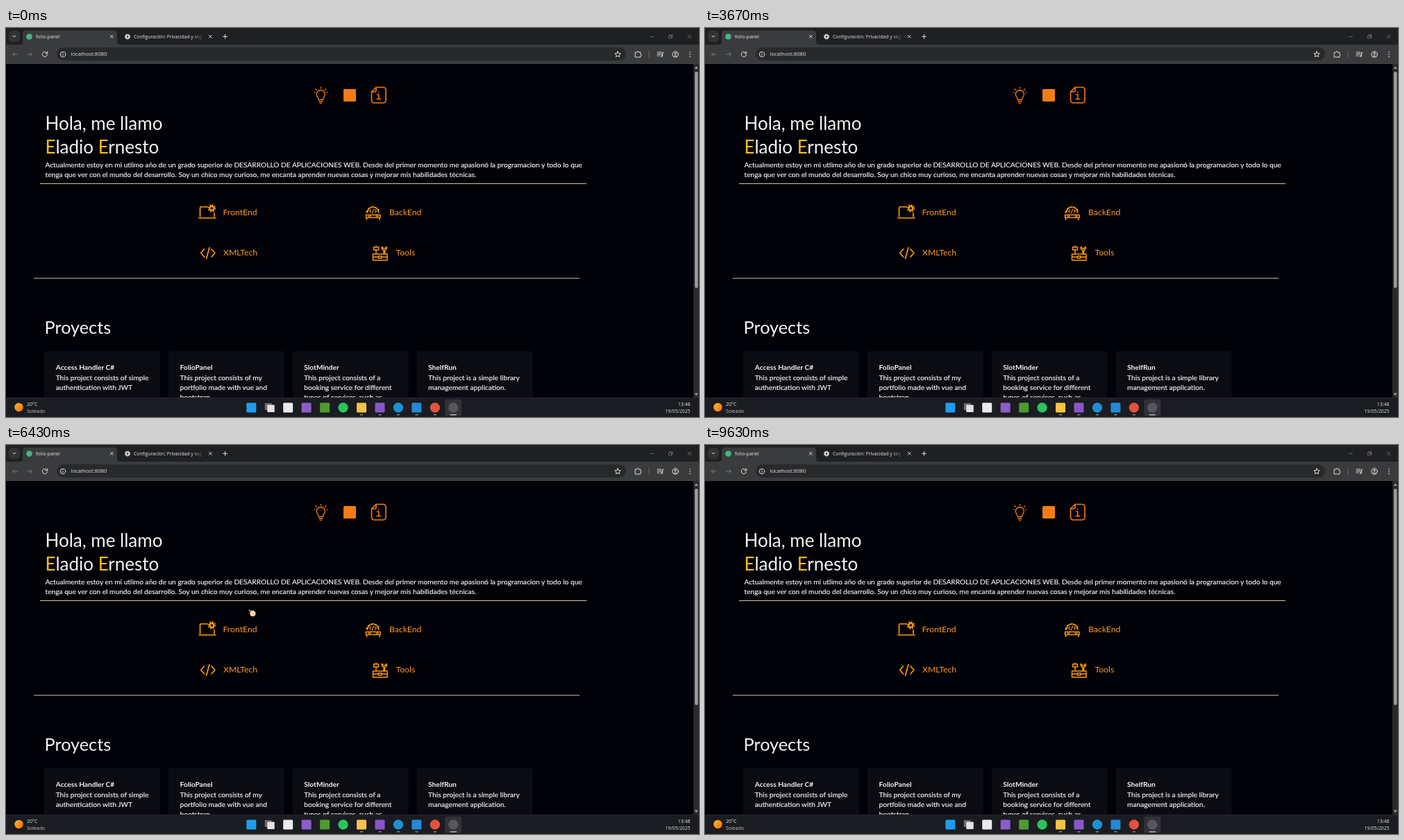
Animation, 998 px wide and 561 px high, one loop 9.73 s. Source, as an HTML page:

```html
<!DOCTYPE html>
<html lang="es">
<head>
<meta charset="utf-8">
<title>Portfolio</title>
<style>
  html, body { margin: 0; width: 100%; height: 100%; overflow: hidden; background: #010108; }
  svg { display: block; width: 100vw; height: 100vh; }
  text { font-family: Lato, sans-serif; font-size: 10.2px; fill: #f4f4f4; white-space: pre; }
  .ui text, text.ui { font-family: "Open Sans", "Noto Sans", sans-serif; font-size: 7px; fill: #e4e4e4; }
  .big { font-size: 26px; }
  .body { stroke: #f4f4f4; stroke-width: .18px; }
  .bold { font-weight: 700; }
  .label { font-size: 12.2px; fill: #ff9a1c; }
  .level { font-size: 9.1px; fill: #8f8f93; text-anchor: end; }
  .e { fill: #ffbe1a; }
  .line { fill: none; stroke-linecap: round; stroke-linejoin: round; }
  .top { stroke: #f57c14; stroke-width: 1.6; }
  .skill { stroke: #ff9a0c; stroke-width: 1.7; }
  .chrome { stroke: #dedede; stroke-width: 1; }
  .rule { stroke: #cfc7a6; stroke-width: 1; }
</style>
</head>
<body>
<svg viewBox="0 0 998 561" preserveAspectRatio="none">
  <defs>
    <clipPath id="fold"><rect id="foldBox" x="510" y="284" width="180" height="0"/></clipPath>
    <linearGradient id="fade" x1="270" x2="284" gradientUnits="userSpaceOnUse">
      <stop stop-color="#e4e4e4"/><stop offset="1" stop-color="#e4e4e4" stop-opacity="0"/>
    </linearGradient>
    <linearGradient id="sun" x2="1" y2="1"><stop stop-color="#ffb52e"/><stop offset="1" stop-color="#f0700c"/></linearGradient>
  </defs>
  <rect width="998" height="561" fill="#010108"/>

  <!-- top links -->
  <g class="line top">
    <path d="M450.3 103.5c0-3-3-4.3-3-8a6 6 0 0 1 12 0c0 3.700-3 5-3 8zM450.800 106h5M452 108.300h2.600M453.300 85.500v1.600M446 88l1.200 1.200M460.600 88l-1.200 1.200M444.500 93h.5M462 93h.5" stroke-width="1.300"/>
    <path d="M533 85.500h10q4 0 4 4v14.500q0 4-4 4h-12.500q-4 0-4-4v-12zM533 85.500v4.500q0 2-2 2h-4.500"/>
    <path d="M534.500 96h2.300v6.500M534 102.500h5.400M536.600 92.600v.3" stroke-width="1.500"/>
  </g>
  <rect x="486" y="88" width="18" height="18" rx="1.500" fill="#f57c14"/>
  <path id="under" class="rule" d="M-16.500 113h33"/>

  <g id="page">
    <text class="big" x="56.500" y="147">Hola, me llamo</text>
    <text class="big" x="56.500" y="181"><tspan class="e">E</tspan>ladio <tspan class="e">E</tspan>rnesto</text>
    <text class="body" x="56.500" y="201">Actualmente estoy en mi utlimo año de un grado superior de DESARROLLO DE APLICACIONES WEB. Desde del primer momento me apasionó la programacion y todo lo que</text>
    <text class="body" x="56.500" y="215">tenga que ver con el mundo del desarrollo. Soy un chico muy curioso, me encanta aprender nuevas cosas y mejorar mis habilidades técnicas.</text>
    <path class="rule" d="M49 224.500H836"/>

    <g class="line skill">
      <path d="M290 258h-9q-1.500 0-1.500 1.500V272M300 267v5M278 274h24" />
      <circle cx="296.300" cy="260" r="3" stroke-width="2.300"/>
      <circle cx="296.300" cy="260" r="5" stroke-dasharray="1.900 2.030" stroke-linecap="butt"/>
      <path d="M520.500 266a8 8 0 0 1 16 0" stroke-width="1.600"/>
      <path d="M519 266a9.700 9.700 0 0 1 19 0" stroke-dasharray="2.600 2.600" stroke-linecap="butt"/>
      <path d="M525.500 262l-2 2 2 2M531.500 262l2 2-2 2M529.500 261l-2 6" stroke-width="1.100"/>
      <path d="M518.500 269.500h20.500v4h-20.500zM519.500 274v2.500M538 274v2.500M522 271.500h3M533 271.500h3" stroke-width="1.500"/>
    </g>
    <text class="label" x="312.500" y="270">FrontEnd</text>
    <text class="label" x="552" y="270">BackEnd</text>
    <g id="skills" clip-path="url(#fold)"></g>

    <g id="lower">
      <g class="line skill">
        <path d="M285.500 319l-4.800 5.500 4.800 5.500M296 319l4.800 5.500-4.800 5.500M293 316.500l-4.500 16"/>
        <path d="M528.500 326h20.500v9h-20.500zM528.500 330.300h7M542 330.300h7M536.500 329h4.500v3h-4.500z" stroke-width="1.500"/>
        <path d="M529.500 316h7v4h-7zM533 314.500v1M533 320v5.500M544 325.500v-5a3.500 3.500 0 0 1-2.500-5M545.500 325.500v-5a3.500 3.500 0 0 0 2.500-5M542 316l1.500 2h2.500l1.500-2" stroke-width="1.500"/>
      </g>
      <text class="label" x="313" y="328">XMLTech</text>
      <text class="label" x="561.500" y="328">Tools</text>
      <path class="rule" d="M40 361H826"/>
      <text x="55.500" y="441" style="font-size:25.300px">Proyects</text>
      <g id="cards"></g>
    </g>
  </g>

  <!-- scrollbar -->
  <rect x="990" y="52" width="8" height="481" fill="#2a2a2c"/>
  <rect id="thumb" x="992" y="63" width="4.500" height="312" rx="2.200" fill="#9c9c9c"/>
  <path d="M991.500 59l2.600-4 2.600 4zM991.500 526.500l2.600 4 2.600-4z" fill="#9c9c9c"/>

  <!-- link address -->
  <g id="status" class="ui">
    <path d="M0 521h154q3.500 0 3.500 3.500V533H0z" fill="#37383b"/>
    <text x="2.500" y="529.300" style="font-size:6.900px;fill:#cfcfcf">https://www.linkedin.com/in/eladioernestodev/</text>
  </g>

  <!-- browser -->
  <g class="ui">
    <rect width="998" height="25" fill="#1f2022"/>
    <rect y="24" width="998" height="28" fill="#3a3b3d"/>
    <path d="M20 24q4 0 4-4V8q0-4.500 4.500-4.500h127q4.500 0 4.500 4.500v12q0 4 4 4z" fill="#3a3b3d"/>
    <rect x="4" y="4" width="16" height="16" rx="5" fill="#323335"/>
    <rect x="73" y="28" width="820" height="19" rx="9.500" fill="#28292b"/>
    <circle cx="33.500" cy="12.500" r="4.300" fill="#41b883"/>
    <text x="43" y="15">folio-panel</text>
    <text x="184" y="15" style="font-size:6.800px;fill:url(#fade)">Configuración: Privacidad y seg</text>
    <text x="93.500" y="40.300" style="font-size:7.700px">localhost:8080</text>
    <g class="line chrome">
      <path d="M10 11l2 2 2-2M150.300 10.300l4 4m0-4l-4 4M292.300 10.300l4 4m0-4l-4 4M312.500 12.300h6M315.500 9.300v6"/>
      <path d="M16.500 38h-7m3-3l-3 3 3 3M30.500 38h7m-3-3l3 3-3 3" stroke="#77787a"/>
      <path d="M59.300 36.500a3.600 3.600 0 1 0 .2 2.300M59.700 34.200v2.600h-2.600"/>
      <circle cx="82" cy="38" r="3.700"/><path d="M82 37.800v1.900M82 36v.1"/>
      <path d="M881 33.800l1.200 2.700 3 .3-2.200 2 .6 2.900-2.600-1.500-2.600 1.500.6-2.900-2.200-2 3-.3z"/>
      <path d="M906.500 35h2.300a1.300 1.300 0 0 1 2.600 0h2.300v2.500a1.300 1.300 0 0 1 0 2.600v1.900h-7.200z"/>
      <path d="M926 33.500v9" stroke="#66676a"/>
      <path d="M938 35h6M938 37.500h6M938 40h3M945.500 40v-4.500h1.500"/><circle cx="944.300" cy="40.300" r="1.200"/>
      <circle cx="964" cy="38" r="4.300"/><circle cx="964" cy="36.700" r="1.300"/><path d="M961.500 40.800q2.500-2 5 0"/>
      <path d="M985 34.700v.1M985 38v.1M985 41.300v.1" stroke-width="1.600"/>
      <circle cx="175" cy="12.500" r="2.300" stroke-width="2"/>
      <circle cx="175" cy="12.500" r="3.800" stroke-dasharray="1.500 1.484" stroke-linecap="butt"/>
    </g>
    <path id="buttons" class="line chrome" d="M927.300 12.500h5M954.700 11h3.800v3.800h-3.800zM956 11v-1.300h3.800v3.800h-1.300M982 9.700l5 5m0-5l-5 5"/>
  </g>

  <!-- taskbar -->
  <g class="ui">
    <rect y="533" width="998" height="28" fill="#1a1c21"/>
    <path d="M0 533.300H998" stroke="#303238" stroke-width=".6"/>
    <circle cx="18.500" cy="547" r="6.200" fill="url(#sun)"/>
    <text x="30" y="545">20°C</text>
    <text x="30" y="555" style="fill:#c4c4c6">Soleado</text>
    <text x="985.500" y="545" text-anchor="end">13:48</text>
    <text x="985.500" y="555" text-anchor="end" style="font-size:6.800px">19/05/2025</text>
    <rect id="tile" y="535.500" width="24" height="24" rx="3" fill="#303238"/>
    <g id="tasks"></g>
    <rect id="mark" y="557" width="10" height="1.600" rx=".8" fill="#a9abb0"/>
  </g>

  <g id="cursor">
    <path d="M0 0l4.200 2-2.200 2.200z" fill="#e0963c"/>
    <circle cx="6.300" cy="6.300" r="4.300" fill="#f3d3a2"/>
  </g>
</svg>

<script>
const LOOP = 9730;
const el = id => document.getElementById(id);

const levels = [
  ['C#', 'Advanced'], ['Visual Basic', 'Advanced'], ['Java', 'Advanced'], ['PHP', 'Intermediate'],
  ['Sql', 'Advanced'], ['Pl/Sql', 'Advanced'], ['.NET Framework', 'Advanced'], ['Laravel', 'Intermediate']
];
el('skills').innerHTML = levels.map(([name, level], i) => {
  const y = 297.5 + i * 17.3;
  return `<text class="bold" x="525" y="${y}">${name}</text><text class="level" x="671" y="${y - .5}">${level}</text>`;
}).join('');

const cards = [
  ['Access Handler C#', 'This project consists of simple', 'authentication with JWT'],
  ['FolioPanel', 'This project consists of my', 'portfolio made with vue and', 'bootstrap'],
  ['SlotMinder', 'This project consists of a', 'booking service for different', 'types of services, such as'],
  ['ShelfRun', 'This project is a simple library', 'management application.']
];
el('cards').innerHTML = cards.map((lines, i) => {
  const x = 55 + i * 178.8;
  return `<rect x="${x}" y="466" width="167" height="120" rx="1.5" fill="#0b0b12"/>` + lines.map((s, n) =>
    `<text class="${n ? 'body' : 'bold'}" x="${x + 16.7}" y="${493.3 + n * 14.3}">${s}</text>`).join('');
}).join('');

// shape (s: square, c: circle, v: two windows), colour
const tasks = [
  ['s', '#1f9cf0'], ['v'], ['s', '#e9eaec'], ['s', '#8e5cc8'], ['s', '#4d9a2e'], ['c', '#2bc45a'],
  ['s', '#f6c244'], ['s', '#8a55c9'], ['c', '#1f8fd4'], ['s', '#2489d6'], ['c', '#e0523f'], ['c', '#56565c']
];
const taskX = i => 353.3 + i * 26.45;
el('tasks').innerHTML = tasks.map(([shape, fill], i) => {
  const x = taskX(i);
  const dot = i > 5 ? `<rect x="${x - 2.3}" y="557" width="4.600" height="1.600" rx=".8" fill="#85878c"/>` : '';
  if (shape === 'v') return `<rect x="${x - 7}" y="541" width="10" height="10" rx="1" fill="#6a6c70"/>
    <rect x="${x - 3.500}" y="543.500" width="10.500" height="10.500" rx="1" fill="#e2e2e4"/>`;
  return (shape === 'c'
    ? `<circle cx="${x}" cy="547.500" r="7.200" fill="${fill}"/>`
    : `<rect x="${x - 7}" y="540.500" width="14" height="14" rx="1.500" fill="${fill}"/>`) + dot;
}).join('');

// time, x, y of the pointer tip
const path = [
  [4450, -20, 320], [4830, 437, 137], [5150, 453, 99], [5330, 470, 101], [5670, 510, 102],
  [5900, 536, 99], [6100, 536, 101], [6550, 310, 265], [6750, 312, 267], [7020, 526, 266],
  [7230, 517, 274], [7620, 522, 270], [8000, 330, 318], [8430, 7, 311], [8490, -20, 311]
];
const clamp = v => Math.max(0, Math.min(1, v));
const smooth = v => v * v * (3 - 2 * v);

function pointer(t) {
  let i = 1;
  while (i < path.length - 1 && t > path[i][0]) i++;
  const [a, b] = [path[i - 1], path[i]];
  const k = smooth(clamp((t - a[0]) / (b[0] - a[0])));
  return [a[1] + (b[1] - a[1]) * k, a[2] + (b[2] - a[2]) * k];
}

const links = [453.5, 494.5, 536];
const show = (id, on) => el(id).setAttribute('visibility', on ? 'visible' : 'hidden');
const move = (id, x, y) => el(id).setAttribute('transform', `translate(${x} ${y})`);

function render(t) {
  const [x, y] = pointer(t);
  const hover = y > 82 && y < 114 ? links.findIndex(c => Math.abs(x - c) < 16.5) : -1;
  const open = smooth(clamp((t - 7030) / 160)) * (1 - smooth(clamp((t - 7620) / 180)));
  const focused = t > 6700 && t < 9250;
  const active = taskX(focused ? 10 : 11);

  move('cursor', x, y);
  show('cursor', t > 4450 && t < 8490);
  show('under', hover >= 0);
  show('status', hover === 1);
  move('under', links[Math.max(0, hover)], 0);
  move('page', 0, hover >= 0 ? .7 : 0);
  move('lower', 0, 141 * open);
  el('foldBox').setAttribute('height', 141 * open);
  el('thumb').setAttribute('height', 312 - 53 * open);
  el('buttons').setAttribute('opacity', focused ? 1 : .35);
  el('tile').setAttribute('x', active - 12);
  el('mark').setAttribute('x', active - 5);
}

function tick() {
  render(performance.now() % LOOP);
  requestAnimationFrame(tick);
}
tick();
</script>
</body>
</html>
```
